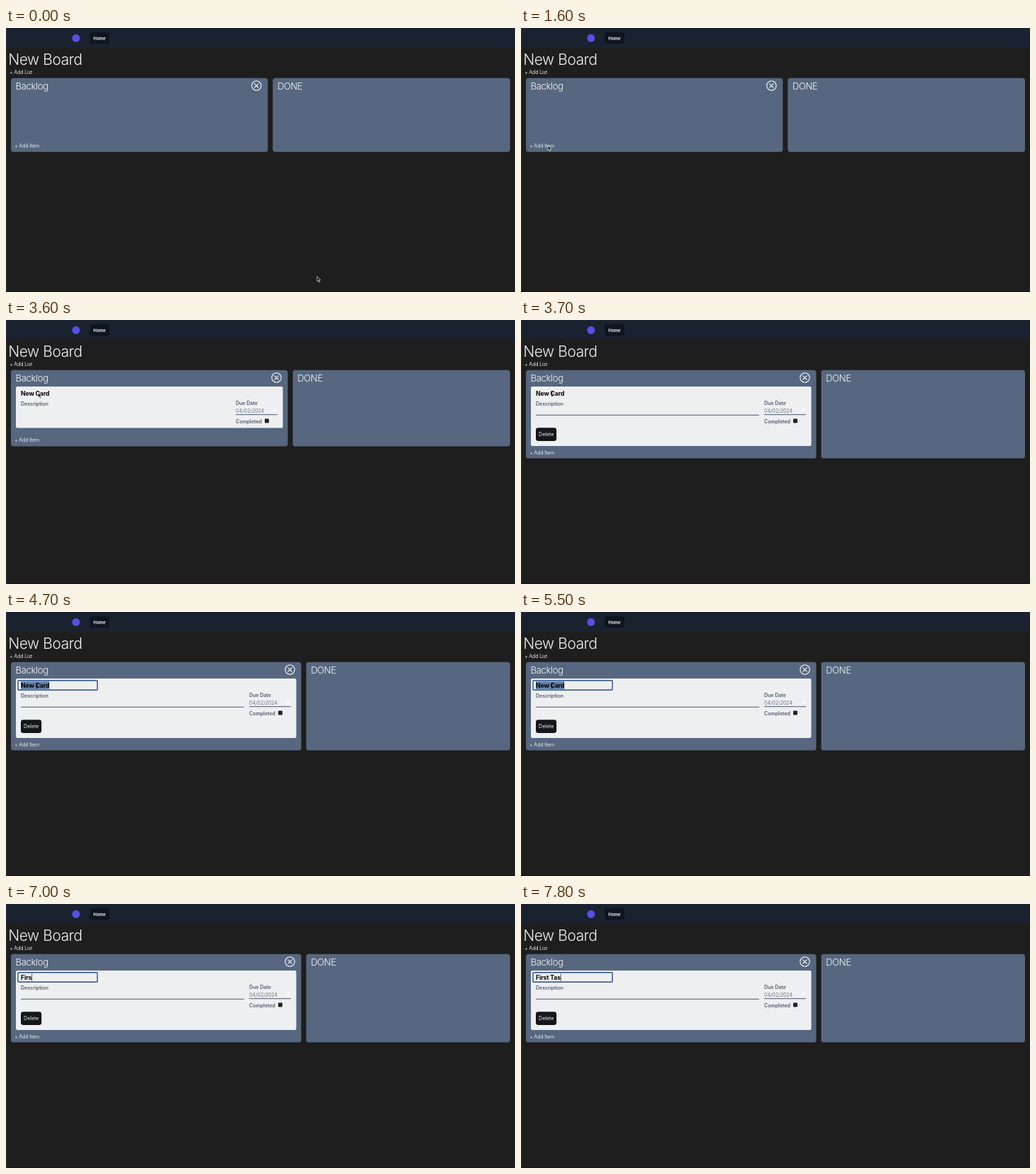
These frames come from a looping animation (720 by 373 pixels, 8 s). An HTML page:

```html
<!DOCTYPE html>
<html lang="en">
<head>
<meta charset="utf-8">
<title>Board</title>
<style>
  html, body { margin: 0; width: 100%; height: 100%; overflow: hidden; background: #1e1e1e; }
  svg { display: block; width: 720px; height: 373px; }
  text { font-family: Inter, Roboto, sans-serif; font-size: 7px; white-space: pre; }
  .h1 { font-size: 21px; font-weight: 300; letter-spacing: -.02em; fill: #f0f0f0; }
  .h2 { font-size: 13.1px; font-weight: 300; letter-spacing: -.028em; fill: #f4f6f9; }
  .add { letter-spacing: -.02em; fill: #e4e6ea; }
  .label { font-weight: 600; fill: #4f5b6e; }
  .date { fill: #6b7585; }
  .title { font-size: 8.75px; font-weight: 700; letter-spacing: -.02em; fill: #050505; }
  .home { font-size: 6.1px; font-weight: 600; fill: #fff; }
  .col { fill: #57677f; }
  .line { stroke: #4b586c; stroke-width: 1; }
</style>
</head>
<body>
<svg viewBox="0 0 720 373">
  <rect width="720" height="373" fill="#1e1e1e"/>
  <rect width="720" height="28" fill="#19222e"/>
  <rect width="1" height="373" fill="#2c2e31"/>
  <rect y="371.5" width="720" height="1.5" fill="#161616"/>
  <circle cx="99" cy="14.3" r="5.5" fill="#5850e6"/>
  <rect x="118.5" y="6" width="27.5" height="16" rx="2.6" fill="#0f1520"/>
  <text class="home" x="132.3" y="16.6" text-anchor="middle">Home</text>
  <text class="h1" x="3.2" y="52.4">New Board</text>
  <text class="add" x="5" y="64.6">+ Add List</text>

  <rect id="left" class="col" x="7" y="70.7" rx="3.5"/>
  <rect id="right" class="col" y="70.7" rx="3.5"/>
  <text class="h2" x="13.6" y="87.3">Backlog</text>
  <text class="h2" id="done" y="87.3">DONE</text>
  <g id="close" fill="none" stroke="#f4f6f9" stroke-width="1.1" stroke-linecap="round">
    <circle cy="81.5" r="6.7"/>
    <path d="M-2.7 78.8l5.4 5.4M2.7 78.8l-5.4 5.4"/>
  </g>
  <text class="add" id="item" x="12" >+ Add Item</text>

  <g id="card">
    <rect id="paper" x="14" y="94" rx="2" fill="#eeeff1"/>
    <g id="input">
      <rect x="17" y="96.8" width="112.3" height="13.4" rx="1" fill="#eeeff1" stroke="#2b4f8a" stroke-width="1.4"/>
      <rect id="sel" y="98.2" height="10.8" fill="#617ea8"/>
    </g>
    <text class="title" id="title" x="21" y="107"></text>
    <rect id="caret" y="98.5" width=".8" height="10.5" fill="#333"/>
    <text class="label" x="21" y="121.1">Description</text>
    <g id="due">
      <text class="label" x="0" y="119.5">Due Date</text>
      <text class="date" x="0" y="130.6">04/02/2024</text>
      <rect x="53" y="125.2" width="4.5" height="4.5" rx=".7" fill="#fafafa"/>
      <path class="line" d="M0 133.7h59"/>
      <text class="label" x="0" y="145.5">Completed</text>
      <rect x="41" y="139.4" width="6" height="6" rx=".8" fill="#222426"/>
    </g>
    <g id="more">
      <path class="line" d="M21 134.3h316"/>
      <rect x="21" y="152.3" width="29.2" height="18.6" rx="3.4" fill="#151617"/>
      <text x="35.7" y="164.2" text-anchor="middle" fill="#f4f4f4">Delete</text>
    </g>
  </g>

  <path id="arrow" d="M0 0v6.9l1.6-1.4 1.1 2.5 1.3-.6-1.1-2.4h2.1z" fill="#111" stroke="#eee" stroke-width=".7"/>
  <path id="beam" d="M42.6 100.2q1.2 0 1.2 1v5.6q0 1-1.2 1M45 100.2q-1.2 0-1.2 1v5.6q0 1 1.2 1" fill="none" stroke="#1a1a1a" stroke-width=".8"/>
</svg>
<script>
const LOOP = 8000;
const $ = id => document.getElementById(id);
const set = (id, attrs) => { for (const k in attrs) $(id).setAttribute(k, attrs[k]); };
const show = (id, on) => { $(id).style.display = on ? "" : "none"; };
const last = (steps, t) => steps.filter(s => s[0] <= t).pop();

// time, right edge of the first column, bottom of the columns
const layouts = [[0, 370.3, 175], [2200, 398.6, 178.6], [3700, 417.6, 195.5]];
// time, pointer x, y
const moves = [[0, 440, 351], [300, 300, 264], [400, 168, 183],
  [600, 134, 179], [700, 78, 171], [800, 50, 168], [1000, 42, 167], [1100, 38, 166]];
// time, number of letters typed
const typed = [[6400, 1], [6600, 2], [6800, 3], [7000, 4], [7200, 5],
  [7400, 6], [7500, 7], [7700, 8], [7800, 9]];

function pointer(t) {
  if (t < 2900) return last(moves, t).slice(1);
  const p = Math.min(1, (t - 2800) / 800), e = p * p * (3 - 2 * p);
  return [38 + 7.5 * e, 166 - 63.5 * e];
}

function width(s) {
  $("title").textContent = s;
  return $("title").getComputedTextLength();
}

function draw(now) {
  const t = Math.floor(now % LOOP / 100) * 100;
  const [, edge, base] = last(layouts, t);
  const open = t >= 3700, focus = t >= 3800, typing = t >= 6400;

  set("left", { width: edge - 7, height: base - 70.7 });
  set("right", { x: edge + 7, width: 706 - edge, height: base - 70.7 });
  set("done", { x: edge + 13.6 });
  set("close", { transform: `translate(${edge - 16} 0)` });
  set("item", { y: base - (open ? 6 : t < 2200 ? 6 : 6.2) });

  show("card", t >= 2200);
  set("paper", { width: edge - 21, height: open ? 84 : 58.4 });
  set("due", { transform: `translate(${edge - 73.6} 0)` });
  show("more", open);
  show("input", focus);

  if (t >= 2200) {
    const picked = t >= 4100 && !typing;
    const from = t < 4300 ? width("New ") : 0;
    const name = typing ? "First Tas".slice(0, last(typed, t)[1]) : "New Card";
    const w = width(name);
    show("sel", picked);
    set("sel", { x: 21 + from, width: w - from });
    show("caret", typing || focus && !picked);
    set("caret", { x: 21 + (typing ? w : width("New ")) });
    $("title").textContent = name;
  }

  show("arrow", t < 3700);
  show("beam", open && !typing);
  set("arrow", { transform: `translate(${pointer(t)})` });
  requestAnimationFrame(() => draw(performance.now()));
}
draw(performance.now());
</script>
</body>
</html>
```
